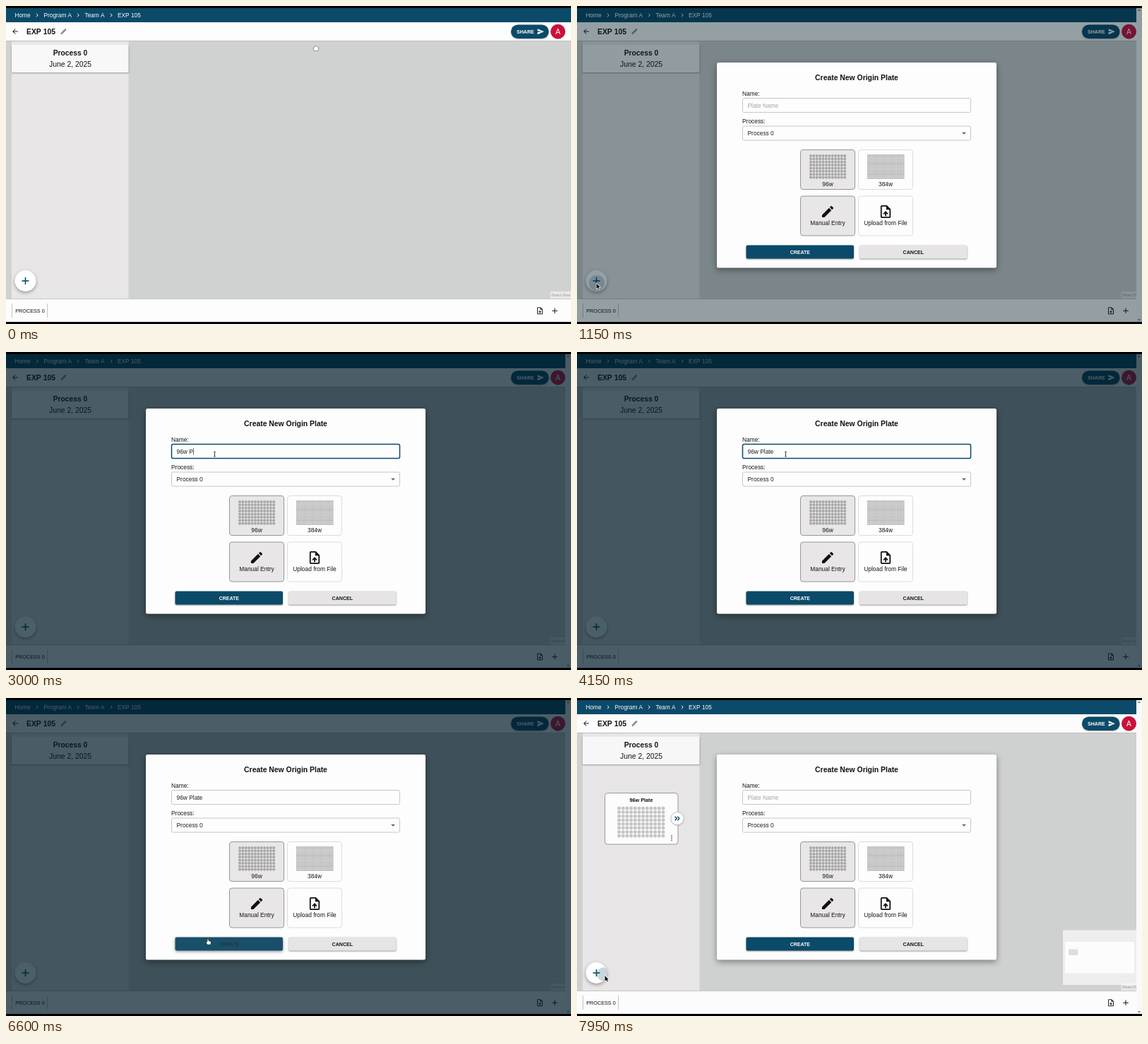
An HTML page with a canvas for the animation above (8000 ms loop, 800 px wide and 450 px high).

```html
<!DOCTYPE html>
<html lang="en">
<head>
<meta charset="utf-8">
<title>Create plate</title>
<style>
html, body { margin: 0; width: 100%; height: 100%; overflow: hidden; background: #000; }
canvas { display: block; width: 800px; height: 450px; }
</style>
</head>
<body>
<canvas id="stage"></canvas>
<script>
const LOOP = 8000;
const FONT = '"Liberation Sans", Arial, sans-serif';
const BLUE = '#0b4a69', INK = '#161616', PAPER = '#fdfdfd', PANEL = '#e8e6e7';
const OPEN_AT = 1050, PRESS_AT = 6560, CLOSE_AT = 6800, REOPEN_AT = 7940;
const TYPE_AT = 2400, TYPE_STEP = 140, PLATE = '96w Plate';
const FAB = { x: 27.5, y: 389, r: 15 };

const ICON = {
  edit: new Path2D('M3 17.25V21h3.75L17.81 9.94l-3.75-3.75zM20.7 7.04a1 1 0 0 0 0-1.41l-2.34-2.34a1 1 0 0 0-1.41 0l-1.83 1.83 3.75 3.75z'),
  pencil: new Path2D('M14.06 9.02l.92.92L5.92 19H5v-.92zM17.66 3c-.25 0-.51.1-.7.29l-1.83 1.83 3.75 3.75 1.83-1.83a1 1 0 0 0 0-1.41l-2.34-2.34c-.2-.2-.45-.29-.71-.29zm-3.6 3.19L3 17.25V21h3.75L17.81 9.94z'),
  back: new Path2D('M20 11H7.83l5.59-5.59L12 4l-8 8 8 8 1.41-1.41L7.83 13H20z'),
  send: new Path2D('M2 21L23 12 2 3v7l15 2-15 2z'),
  file: new Path2D('M14 2H6a2 2 0 0 0-2 2v16a2 2 0 0 0 2 2h12a2 2 0 0 0 2-2V8zm4 18H6V4h7v5h5z'),
  up: new Path2D('M8 15l1.4 1.4 1.6-1.6V19h2v-4.2l1.6 1.6L16 15l-4-4z'),
  add: new Path2D('M11 11h2v3h3v2h-3v3h-2v-3H8v-2h3z')
};

const canvas = document.getElementById('stage');
const ctx = canvas.getContext('2d');
const ratio = window.devicePixelRatio || 1;
canvas.width = 800 * ratio;
canvas.height = 450 * ratio;

const clamp = v => Math.max(0, Math.min(1, v));
const smooth = v => { v = clamp(v); return v * v * (3 - 2 * v); };
const mix = (a, b, k) => `rgb(${a.map((v, i) => Math.round(v + (b[i] - v) * k))})`;

function rect(x, y, w, h, fill) {
  ctx.fillStyle = fill;
  ctx.fillRect(x, y, w, h);
}

function box(x, y, w, h, r, fill, stroke, line = 1) {
  ctx.beginPath();
  ctx.roundRect(x, y, w, h, r);
  if (fill) { ctx.fillStyle = fill; ctx.fill(); }
  if (stroke) { ctx.strokeStyle = stroke; ctx.lineWidth = line; ctx.stroke(); }
}

function disc(x, y, r, fill) {
  ctx.beginPath();
  ctx.arc(x, y, r, 0, 7);
  ctx.fillStyle = fill;
  ctx.fill();
}

function shaded(blur, dy, alpha, draw) {
  ctx.save();
  ctx.shadowColor = `rgba(0,0,0,${alpha})`;
  ctx.shadowBlur = blur * ratio;
  ctx.shadowOffsetY = dy * ratio;
  draw();
  ctx.restore();
}

function text(str, x, y, size, color = INK, weight = 400, align = 'left') {
  ctx.font = `${weight} ${size}px ${FONT}`;
  ctx.textAlign = align;
  ctx.fillStyle = color;
  ctx.fillText(str, x, y);
}

function line(points, color, width) {
  ctx.beginPath();
  points.forEach(([x, y]) => ctx.lineTo(x, y));
  ctx.strokeStyle = color;
  ctx.lineWidth = width;
  ctx.stroke();
}

// Icons live on a 24-unit grid, centred on x, y.
function icon(x, y, size, color, ...paths) {
  ctx.save();
  ctx.translate(x - size / 2, y - size / 2);
  ctx.scale(size / 24, size / 24);
  ctx.fillStyle = color;
  paths.forEach(p => ctx.fill(p));
  ctx.restore();
}

function plus(x, y, r, color, width) {
  line([[x - r, y], [x + r, y]], color, width);
  line([[x, y - r], [x, y + r]], color, width);
}

function chevron(x, y, w, h, color, width) {
  line([[x, y - h], [x + w, y], [x, y + h]], color, width);
}

function wells(x, y, cols, rows, dx, dy, r, color) {
  ctx.beginPath();
  for (let i = 0; i < cols; i++)
    for (let j = 0; j < rows; j++) {
      ctx.moveTo(x + i * dx + r, y + j * dy);
      ctx.arc(x + i * dx, y + j * dy, r, 0, 7);
    }
  ctx.fillStyle = color;
  ctx.fill();
}

function drawHeader() {
  rect(0, 3, 800, 20, BLUE);
  [['Home', 12.5], ['Program A', 53.5], ['Team A', 111.5], ['EXP 105', 158]]
    .forEach(([s, x]) => text(s, x, 16, 8.3, '#fff'));
  [43, 101, 148].forEach(x => chevron(x, 13, 2.2, 2.3, '#fff', 1));
  rect(0, 23, 800, 27, PAPER);
  rect(0, 49, 800, 1, '#bdbebe');
  icon(13, 36, 11.5, '#222', ICON.back);
  text('EXP 105', 29, 40, 10.4, '#111', 700);
  icon(81.5, 36, 10, '#555', ICON.pencil);
  shaded(2, 1, 0.3, () => box(715, 26.5, 53.5, 19.5, 9.75, BLUE));
  text('SHARE', 723, 38.6, 7.1, '#fff', 700);
  icon(757, 36.2, 10.5, '#fff', ICON.send);
  disc(781.5, 36.2, 10.5, '#c9113b');
  text('A', 781.5, 40, 10.4, '#fff', 400, 'center');
}

function drawCard() {
  box(39.5, 134.5, 103.5, 72.5, 4, PAPER, '#9a9a9a');
  text(PLATE, 91, 147, 7.25, '#111', 700, 'center');
  wells(59.6, 156, 12, 8, 5.67, 5.57, 2.5, '#c8c6c7');
  shaded(2, 0.5, 0.3, () => disc(142, 170.5, 9.2, '#fff'));
  box(133, 161.5, 18, 18, 9, null, '#b5b5b5', 0.7);
  [138.7, 142.3].forEach(x => chevron(x, 170.5, 2.5, 2.8, BLUE, 1.4));
  [195, 198, 201].forEach(y => disc(134, y, 0.85, '#333'));
}

function drawMinimap() {
  rect(688, 328.5, 104, 77.5, '#efefef');
  rect(691, 345, 98, 44.5, PAPER);
  rect(696, 355.5, 13, 8.5, '#dfdfdf');
}

function drawFab(t) {
  shaded(5, 2, 0.35, () => disc(FAB.x, FAB.y, FAB.r, '#fff'));
  [[1000, 28, 393], [7850, 39, 391]].forEach(([at, x, y]) => {
    const age = t - at;
    if (age < 0 || age > 650) return;
    ctx.save();
    ctx.beginPath();
    ctx.arc(FAB.x, FAB.y, FAB.r, 0, 7);
    ctx.clip();
    const k = smooth(age / 450);
    disc(x + (FAB.x - x) * k, y + (FAB.y - y) * k, 8 + 12 * k,
      `rgba(11,74,105,${0.22 * (1 - clamp((age - 250) / 400))})`);
    ctx.restore();
  });
  plus(FAB.x, FAB.y, 5, BLUE, 1.6);
}

function drawPage(t) {
  drawHeader();
  rect(0, 50, 800, 364, '#d0d2d1');
  rect(8, 50, 165.5, 364, PANEL);
  shaded(2, 1, 0.35, () => rect(8, 54.5, 165.5, 39.5, '#f8f8f8'));
  text('Process 0', 91, 70, 10.3, INK, 700, 'center');
  text('June 2, 2025', 91, 86, 10.4, INK, 400, 'center');
  if (t >= CLOSE_AT) {
    drawCard();
    drawMinimap();
  }
  rect(770.5, 404, 29.5, 10, 'rgba(255,255,255,.5)');
  text('React Flow', 772.3, 411, 5.4, '#999');
  drawFab(t);
  rect(0, 414, 800, 33, PAPER);
  rect(0, 414, 800, 1, '#c4c5c5');
  [8.5, 58.5].forEach(x => line([[x, 421], [x, 441]], '#c6c6c6', 1));
  text('PROCESS 0', 34, 433.7, 7.25, '#111', 400, 'center');
  icon(756, 431.3, 12, '#222', ICON.file, ICON.add);
  plus(777, 431.3, 3.8, '#222', 1.1);
}

function drawScrollbar() {
  rect(792, 3, 8, 444, '#fafafa');
  ctx.fillStyle = '#8a8a8a';
  [[6, -1], [444, 1]].forEach(([y, d]) => {
    ctx.beginPath();
    ctx.moveTo(793.7, y - d);
    ctx.lineTo(798.3, y - d);
    ctx.lineTo(796, y + d * 1.8);
    ctx.fill();
  });
}

function drawNameField(t, mouse) {
  const typed = t < REOPEN_AT ? clamp((t - TYPE_AT + TYPE_STEP) / TYPE_STEP / PLATE.length) : 0;
  const value = PLATE.slice(0, Math.floor(typed * PLATE.length + 1e-6));
  const focused = t >= 2150 && t < PRESS_AT - 60;
  const hover = inside(mouse, 234, 130, 324, 21);
  const edge = focused ? BLUE : hover ? '#333' : '#c6c6c6';
  box(234.5, 130.5, 323, 20, 2, PAPER, edge, focused ? 1.5 : 1);
  text(value || 'Plate Name', 241.5, 143.6, 8.4, value ? '#222' : '#a5a5a5');
  const lastKey = TYPE_AT + TYPE_STEP * (PLATE.length - 1);
  const blink = t < TYPE_AT ? (t - 2150) % 1000 < 500
    : t < lastKey || (t - lastKey) % 1000 < 500;
  if (focused && blink) {
    const w = value ? ctx.measureText(value).width : 0;
    rect(241.8 + w, 136, 0.7, 9.5, '#222');
  }
}

function drawTile(x, y, label, chosen, art) {
  box(x + 0.5, y + 0.5, 77, 56, 3.5, chosen ? PANEL : PAPER, chosen ? '#979797' : '#dcdcdc');
  text(label, x + 39, y + (y < 250 ? 52 : 41.5), 8.4, INK, 400, 'center');
  art();
}

function drawDialog(t, mouse) {
  shaded(9, 3, 0.4, () => box(198, 80, 396, 290.5, 2.5, PAPER));
  text('Create New Origin Plate', 396, 105, 10.4, '#111', 700, 'center');
  text('Name:', 234, 127, 8.4);
  text('Process:', 234, 166.3, 8.4);
  drawNameField(t, mouse);
  const hover = inside(mouse, 234, 170, 324, 20);
  box(234.5, 170, 323, 20, 2, PAPER, hover ? '#333' : '#c6c6c6');
  text('Process 0', 241.5, 183.3, 8.4, '#222');
  ctx.beginPath();
  ctx.moveTo(545, 178.8);
  ctx.lineTo(551, 178.8);
  ctx.lineTo(548, 181.8);
  ctx.fillStyle = '#666';
  ctx.fill();

  drawTile(316, 203, '96w', true, () => wells(331, 212, 12, 8, 4.38, 4.37, 2.05, '#aaa9a9'));
  drawTile(398, 203, '384w', false, () => wells(412, 211, 24, 16, 2.2, 2.18, 0.98, '#a5a5a5'));
  drawTile(316, 268.5, 'Manual Entry', true, () => icon(355, 291, 21.5, '#111', ICON.edit));
  drawTile(398, 268.5, 'Upload from File', false, () => icon(437, 291, 21.5, '#111', ICON.file, ICON.up));

  const over = inside(mouse, 239, 338, 153, 20);
  const off = t >= PRESS_AT && t < REOPEN_AT;
  const fade = off ? smooth((t - PRESS_AT) / 250) : 0;
  const fill = mix(over ? [10, 68, 96] : [11, 74, 105], [224, 224, 224], fade);
  shaded(over ? 4 : 2, over ? 1.6 : 1, 0.4, () => box(239.5, 338.5, 152.5, 19, 2, fill));
  text('CREATE', 315.8, 350.5, 7, off ? 'rgba(35,45,50,.75)' : '#fff', 700, 'center');
  shaded(2, 1, 0.4, () => box(400, 338.5, 152.5, 19, 2, '#e6e4e5'));
  text('CANCEL', 476.3, 350.5, 7.1, INK, 700, 'center');
}

// Mouse stops: time, x, y
const STOPS = [
  [0, 439, 60], [100, 439, 60], [850, 27.5, 392.5], [1350, 27.5, 392.5],
  [1900, 289.5, 144.5], [2250, 289.5, 144.5], [2400, 295.5, 144.5], [5250, 295.5, 144.5],
  [5950, 287, 345], [6750, 287, 345], [7150, 182, 281], [7600, 39.5, 393], [LOOP, 39.5, 393]
];

function mouseAt(t) {
  const i = Math.max(1, STOPS.findIndex(s => s[0] > t));
  const [t0, x0, y0] = STOPS[i - 1], [t1, x1, y1] = STOPS[i];
  const k = smooth((t - t0) / (t1 - t0));
  return { x: x0 + (x1 - x0) * k, y: y0 + (y1 - y0) * k };
}

function inside(p, x, y, w, h) {
  return p.x >= x && p.x <= x + w && p.y >= y && p.y <= y + h;
}

const SHAPE = {
  arrow: new Path2D('M0 0V7.6L1.8 6 3 8.6 4.2 8 3.1 5.5H5.4z'),
  grab: new Path2D('M-2.8 3.2L-3.8.5Q-3.8-.6-2.7-.2V-2.2Q-2.2-3.2-1.4-2.4Q-.7-3.7.2-2.6Q1.2-3.4 1.8-2.2Q3-2.5 3.1-1.2V1L2.4 3.4z'),
  pointer: new Path2D('M-1.8 3.8L-3.5.9Q-3.2-.2-2 .7L-1.6-3.2Q-1-4.1-.4-3.2V-.9Q.4-1.6 1-.6Q1.8-1 2.1-.2Q3-.4 3.1.6L2.4 3.8z')
};

function drawMouse(p, dialog) {
  let kind = 'arrow';
  if (!dialog) kind = Math.hypot(p.x - FAB.x, p.y - FAB.y) <= FAB.r ? 'pointer' : p.y < 50 || p.y > 414 ? 'arrow' : 'grab';
  else if (inside(p, 234, 130, 324, 21)) kind = 'beam';
  else if (inside(p, 234, 170, 324, 20) || inside(p, 239, 338, 314, 20)) kind = 'pointer';
  ctx.save();
  ctx.translate(p.x, p.y);
  if (kind === 'beam') {
    line([[0, -3], [0, 3]], '#222', 0.9);
    [-3.3, 3.3].forEach(y => line([[-1.4, y], [1.4, y]], '#222', 0.8));
  } else {
    const dark = kind === 'arrow';
    ctx.lineJoin = 'round';
    ctx.lineWidth = dark ? 1.3 : 0.9;
    ctx.strokeStyle = dark ? '#fff' : '#222';
    ctx.fillStyle = dark ? '#111' : '#fff';
    ctx.stroke(SHAPE[kind]);
    ctx.fill(SHAPE[kind]);
  }
  ctx.restore();
}

function shadeAt(t) {
  if (t >= REOPEN_AT) return 0.7 * smooth((t - REOPEN_AT) / 225);
  if (t >= CLOSE_AT) return 0.7 * (1 - smooth((t - CLOSE_AT) / 195));
  return 0.7 * smooth((t - OPEN_AT) / 180);
}

function render(t) {
  ctx.setTransform(ratio, 0, 0, ratio, 0, 0);
  rect(0, 0, 800, 450, '#000');
  const mouse = mouseAt(t);
  const dialog = t >= OPEN_AT && t < CLOSE_AT || t >= REOPEN_AT;
  drawPage(t);
  if (dialog) drawScrollbar();
  const shade = shadeAt(t);
  if (shade > 0) rect(0, 3, 800, 444, `rgba(0,27,39,${shade})`);
  if (dialog) drawDialog(t, mouse);
  drawMouse(mouse, dialog);
  rect(0, 447, 800, 3, '#000');
}

const start = performance.now();
function tick() {
  render((performance.now() - start) % LOOP);
  requestAnimationFrame(tick);
}
tick();
</script>
</body>
</html>
```
